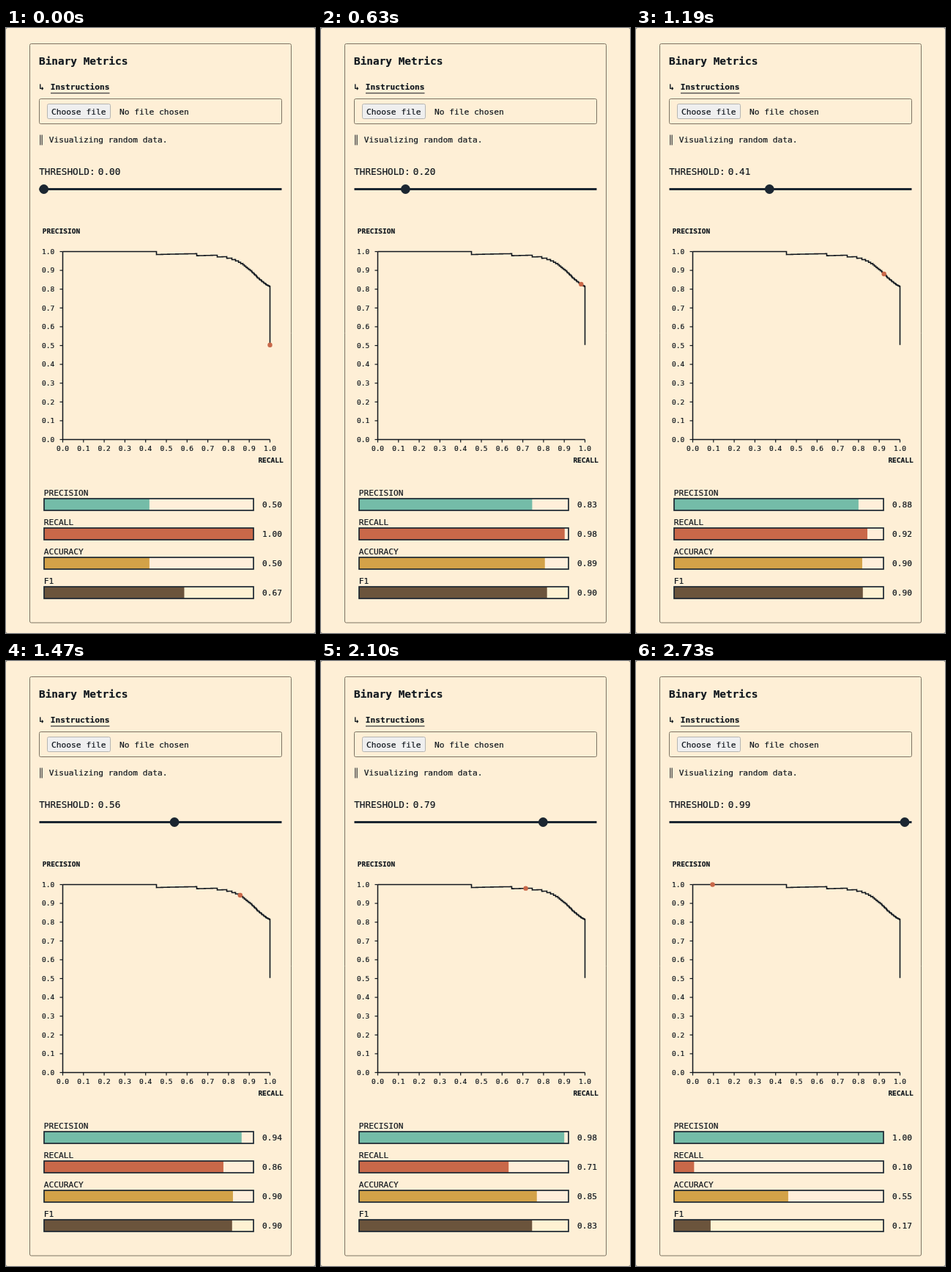
Write an HTML page with a canvas that moves like this. It is 422x824 px and loops after 2.8 s.

```html
<!DOCTYPE html>
<html lang="en">
<head>
<meta charset="utf-8">
<title>Binary Metrics</title>
<style>
  html, body { margin: 0; width: 100%; height: 100%; overflow: hidden; background: #feefd6; }
  canvas { display: block; width: 422px; height: 824px; }
</style>
</head>
<body>
<canvas id="stage"></canvas>
<script>
const W = 422, H = 824, LOOP = 2800, STEP = 70;
const PAPER = '#feefd6', INK = '#10171e', NAVY = '#1b2631', RED = '#c96849', BORDER = '#7c7463';
const PLOT = { x: 77.5, y: 304.5, w: 283, h: 256 };
const RIGHT = PLOT.x + PLOT.w, BOTTOM = PLOT.y + PLOT.h;

// The data set: number of positives, their share, and the threshold of the first miss.
const POSITIVES = 136, SHARE = 0.503, FIRST_MISS = 0.16;
// The slider is dragged by hand: [step, threshold].
const drag = [[0, 0], [16, 0.41], [20, 0.56], [29, 0.79], [34, 0.89], [38, 0.99]];

const canvas = document.getElementById('stage');
const ctx = canvas.getContext('2d');
const ratio = window.devicePixelRatio || 1;
canvas.width = W * ratio;
canvas.height = H * ratio;

const plotX = recall => PLOT.x + PLOT.w * recall;
const plotY = precision => BOTTOM - PLOT.h * precision;

function thresholdAt(step) {
  const i = Math.max(1, drag.findIndex(([s]) => s >= step));
  const [s0, t0] = drag[i - 1], [s1, t1] = drag[i];
  const t = t0 + (t1 - t0) * (step - s0) / (s1 - s0);
  return Math.floor(t * 100 + 1e-6) / 100;
}

// A slow early trickle of false positives, then a sigmoid surge at high recall.
function falsePositives(recall) {
  const surge = 35 / (1 + Math.exp(22 * (0.942 - recall)));
  return Math.floor(4.41 * recall ** 1.87 + surge);
}

function precisionWith(recall, misses) {
  const hits = recall * POSITIVES;
  return misses ? hits / (hits + misses) : 1;
}

function recallAt(threshold) {
  if (threshold < FIRST_MISS) return 1;
  return 1 - threshold ** 2 * (0.458 + 7.2 * Math.max(0, threshold - 0.8) ** 1.65);
}

function measure(threshold) {
  const recall = recallAt(threshold);
  let precision = precisionWith(recall, falsePositives(recall));
  if (threshold < FIRST_MISS) {
    precision -= (precision - SHARE) * (1 - threshold / FIRST_MISS) ** 1.7;
  }
  const hits = recall * SHARE;
  return {
    precision, recall,
    accuracy: hits + 1 - SHARE - hits * (1 / precision - 1),
    f1: 2 * precision * recall / (precision + recall)
  };
}

function buildCurve() {
  const points = [];
  let before = 0;
  for (let i = 0; i <= PLOT.w; i++) {
    const recall = i / PLOT.w, now = falsePositives(recall);
    for (const misses of [before, now]) {
      points.push([plotX(recall), plotY(precisionWith(recall, misses))]);
    }
    before = now;
  }
  points.push([RIGHT, plotY(SHARE)]);
  return points;
}
const curve = buildCurve();

function text(str, x, y, size, bold = false, align = 'left') {
  ctx.font = `${bold ? 'bold ' : ''}${size}px "DejaVu Sans Mono", monospace`;
  ctx.textAlign = align;
  ctx.fillStyle = ctx.strokeStyle = INK;
  ctx.lineWidth = 0.2;
  ctx.fillText(str, x, y);
  ctx.strokeText(str, x, y);
}

function line(points, width, color = INK) {
  ctx.beginPath();
  for (const [x, y] of points) ctx.lineTo(x, y);
  ctx.lineWidth = width;
  ctx.strokeStyle = color;
  ctx.stroke();
}

function box(x, y, w, h, radius, border, fill) {
  ctx.beginPath();
  ctx.roundRect(x, y, w, h, radius);
  if (fill) { ctx.fillStyle = fill; ctx.fill(); }
  if (border) { ctx.lineWidth = 1; ctx.strokeStyle = border; ctx.stroke(); }
}

function disc(x, y, r, color) {
  ctx.beginPath();
  ctx.arc(x, y, r, 0, Math.PI * 2);
  ctx.fillStyle = color;
  ctx.fill();
}

function drawHeader() {
  ctx.fillStyle = '#8a8578';
  ctx.fillRect(0, 0, W, H);
  box(0, 0, W, H, 2.5, null, PAPER);
  box(32.5, 21.5, 357, 788.5, 2, BORDER);
  text('Binary Metrics', 45, 50.2, 14.4, true);
  text('↳', 45.2, 84, 11.2, true);
  text('Instructions', 60.7, 84, 11.2, true);
  line([[61, 88.7], [141.5, 88.7]], 1.1);
  box(45.5, 96.5, 331, 34, 2, BORDER);
  box(56.5, 103.5, 86, 20, 2, '#b5b5b2', '#efefef');
  text('Choose file', 62, 117.5, 11.25);
  text('No file chosen', 154.9, 117.5, 11.25);
  for (const x of [46.8, 49.2]) line([[x, 145.5], [x, 159.5]], 1);
  text('Visualizing random data.', 58.8, 156, 11.2);
}

function drawSlider(threshold) {
  text('THRESHOLD:', 45.2, 200, 12.7);
  text(threshold.toFixed(2), 125.8, 200, 12.7);
  line([[45.5, 219.5], [376.5, 219.5]], 3, NAVY);
  disc(51.7 + 318.5 * threshold, 219.5, 6.4, NAVY);
}

function drawPlot(m) {
  text('PRECISION', 49.7, 280.3, 9.5, true);
  text('RECALL', 344.4, 592.3, 9.5, true);
  line([[PLOT.x, PLOT.y], [PLOT.x, BOTTOM], [RIGHT, BOTTOM]], 1.5);
  for (let i = 0; i <= 10; i++) {
    const label = (i / 10).toFixed(1);
    const x = plotX(i / 10), y = plotY(i / 10);
    line([[x, BOTTOM], [x, BOTTOM + 4]], 1.2);
    line([[PLOT.x - 4, y], [PLOT.x, y]], 1.2);
    text(label, x, 576.4, 9.5, false, 'center');
    text(label, 66.2, y + 3.2, 9.5, false, 'right');
  }
  line(curve, 1.6);
  disc(plotX(m.recall), plotY(m.precision), 3.2, RED);
}

function drawBar(label, value, y, color, empty) {
  text(label, 51.8, y - 4, 11.2);
  ctx.fillStyle = empty;
  ctx.fillRect(52, y, 286, 16);
  ctx.fillStyle = color;
  ctx.fillRect(52, y, 286 * value, 16);
  ctx.lineWidth = 1.7;
  ctx.strokeStyle = NAVY;
  ctx.strokeRect(52, y, 286, 16);
  text(value.toFixed(2), 350, y + 12.2, 11.2);
}

function render(now) {
  const step = Math.max(0, Math.floor((now % LOOP) / STEP) - 1);
  const threshold = thresholdAt(step);
  const m = measure(threshold);
  ctx.setTransform(ratio, 0, 0, ratio, 0, 0);
  drawHeader();
  drawSlider(threshold);
  drawPlot(m);
  drawBar('PRECISION', m.precision, 641, '#74bca8', '#ffefda');
  drawBar('RECALL', m.recall, 681, RED, '#ffeed9');
  drawBar('ACCURACY', m.accuracy, 721, '#d3a248', '#ffeedb');
  drawBar('F1', m.f1, 761, '#6b543c', '#fff2d3');
}

const start = performance.now();
function tick() {
  render(performance.now() - start);
  requestAnimationFrame(tick);
}
tick();
</script>
</body>
</html>
```
